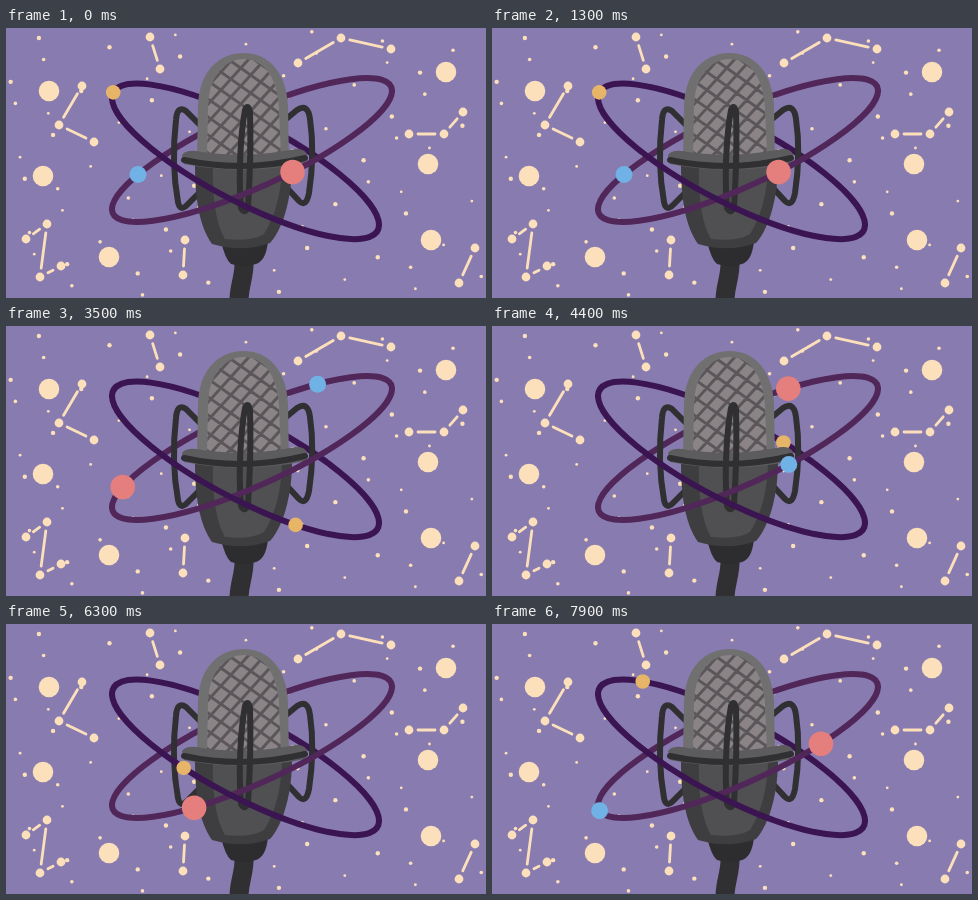
Write an HTML page that moves like this. It is 480 by 270 pixels and loops after 8 s.

```html
<!DOCTYPE html>
<html lang="en">
<head>
<meta charset="utf-8">
<title>Microphone with orbits</title>
<style>
html, body { margin: 0; width: 100%; height: 100%; overflow: hidden; background: #887bb0; }
svg { display: block; width: 100vw; height: 100vh; }
.orbit, .wire { fill: none; stroke-linecap: round; stroke-linejoin: round; }
.orbit { stroke-width: 6; }
.wire { stroke: #302f31; stroke-width: 6; }
</style>
</head>
<body>
<svg viewBox="0 0 480 270">
  <defs>
    <clipPath id="grille">
      <path d="M201 129 L202 78 C203 47 219 31 238 31 S271 48 273 80 L275 129Z"/>
    </clipPath>
    <clipPath id="body">
      <path d="M189 136 C189 170 193 198 206 216 Q236 225 264 215 C279 198 286 165 286 136Z"/>
    </clipPath>
  </defs>
  <rect width="480" height="270" fill="#887bb0"/>
  <g id="stars" fill="#fce0bb"></g>
  <g id="rear"></g>

  <path class="wire" d="M194 97 L180 83 Q171 77 170 92 Q165 135 172 174 Q174 184 181 177 L193 165"/>
  <path class="wire" d="M279 92 L291 82 Q302 75 304 91 Q309 125 303 165 Q300 180 293 173 L281 160"/>
  <path d="M238 232 C239 248 233 257 233 273" fill="none" stroke="#302f31" stroke-width="19"/>
  <path d="M215 213 L262 213 Q260 233 250 236 Q238 240 225 236 Q219 231 215 213Z" fill="#2d2c2e"/>
  <g clip-path="url(#body)">
    <rect x="185" y="130" width="105" height="95" fill="#3e3d3f"/>
    <path d="M207 136 C206 170 210 196 219 211 Q245 214 258 206 C270 188 276 160 276 136Z" fill="#504f51"/>
  </g>
  <path d="M191 131 L192 78 C193 42 214 25 238 25 S281 44 282 80 L283 131Z" fill="#717071"/>
  <g clip-path="url(#grille)">
    <rect x="195" y="25" width="85" height="110" fill="#8a8487"/>
    <path id="mesh" fill="none" stroke="#5b565a" stroke-width="3"/>
  </g>
  <path d="M176 127 Q180 122 190 123 Q237 131 284 122 Q297 119 301 126 L299 135 Q240 148 178 136Z" fill="#5c5b5d"/>
  <path class="wire" d="M178 132 Q238 145 299 130" stroke-width="7"/>
  <path class="wire" d="M235 180 C232 145 235 103 239 82 Q242 75 244 84 C245 115 244 148 242 179 Q239 187 235 180Z"/>
  <g id="front"></g>
</svg>
<script>
const $ = id => document.getElementById(id);

function add(parent, tag, attrs) {
  const el = document.createElementNS("http://www.w3.org/2000/svg", tag);
  for (const k in attrs) el.setAttribute(k, attrs[k]);
  return $(parent).appendChild(el);
}
const dot = (parent, cx, cy, r, fill) => add(parent, "circle", { cx, cy, r, ...(fill && { fill }) });
const points = text => text.split(" ").map(p => p.split(",").map(Number));

// Small stars: an even quasi-random scatter
for (let i = 1; i <= 80; i++) {
  dot("stars", i * 0.7549 % 1 * 480, i * 0.5698 % 1 * 270, 1.4 + i % 3 * 0.4);
}
for (const [x, y] of points("43,63 37,148 103,229 440,44 422,136 425,212")) dot("stars", x, y, 10.3);

// Constellations: dots joined by lines that stop short of them
function constellation(text) {
  points(text).forEach(([x, y], i, all) => {
    dot("stars", x, y, 4.4);
    if (!i) return;
    const [px, py] = all[i - 1];
    const gap = 9 / Math.hypot(x - px, y - py), dx = (x - px) * gap, dy = (y - py) * gap;
    add("stars", "path", {
      d: `M${px + dx} ${py + dy}L${x - dx} ${y - dy}`,
      stroke: "#fce0bb", "stroke-width": 2.8, "stroke-linecap": "round"
    });
  });
}
[
  "144,9 154,41", "76,58 53,97 88,114", "20,211 41,196 34,249 55,238", "179,212 177,247",
  "292,35 335,10 385,21", "403,106 438,106 457,84", "469,220 453,255"
].forEach(constellation);

// Grille mesh
let mesh = "";
for (let y = -60; y < 230; y += 18) mesh += `M195 ${y}l85 60M195 ${y}l85 -94`;
$("mesh").setAttribute("d", mesh);

// Each orbit runs clockwise: the far half first, then the near half
function orbit(left, right, arc, stroke) {
  const half = (a, b) => `M${a}A${arc} 0 1 ${b}`;
  add("rear", "path", { class: "orbit", d: half(left, right), stroke });
  add("front", "path", { class: "orbit", d: half(right, left), stroke });
  return add("rear", "path", { d: `${half(left, right)}A${arc} 0 1 ${left}`, fill: "none" });
}
const rising = orbit("106 181.3", "386 62.7", "152.9 37.4 -24.5", "#51275a");
const falling = orbit("106 70", "373 196.7", "149.1 40.3 27.6", "#3b1551");

// Each ball makes one turn per cycle; lag holds it back around mid-cycle
function ball(path, r, fill, start, dir, lag) {
  const size = path.getTotalLength();
  const far = dot("rear", 0, 0, r, fill), near = dot("front", 0, 0, r, fill);
  return p => {
    const moved = p - lag * (1 - Math.cos(2 * Math.PI * p)) / 2;
    const turn = (start + dir * moved + 2) % 1;
    const { x, y } = path.getPointAtLength(turn * size);
    const behind = Math.sin(2 * Math.PI * turn) > 0.5;
    for (const el of [far, near]) {
      el.setAttribute("cx", x);
      el.setAttribute("cy", y);
      el.style.display = (el === far) === behind ? "" : "none";
    }
  };
}
const balls = [
  ball(falling, 7.3, "#e6b568", 0.009, 1, 0.086),
  ball(rising, 8.5, "#70b2e5", 0.068, -1, 0),
  ball(rising, 12.3, "#e57f7d", 0.701, -1, 0.04)
];

const STEPS = 13, STEP_MS = 100, LOOP_MS = 8000;
const start = performance.now();
function draw() {
  const step = Math.floor((performance.now() - start) % LOOP_MS / STEP_MS) % STEPS;
  for (const move of balls) move(step / STEPS);
  requestAnimationFrame(draw);
}
draw();
</script>
</body>
</html>
```
